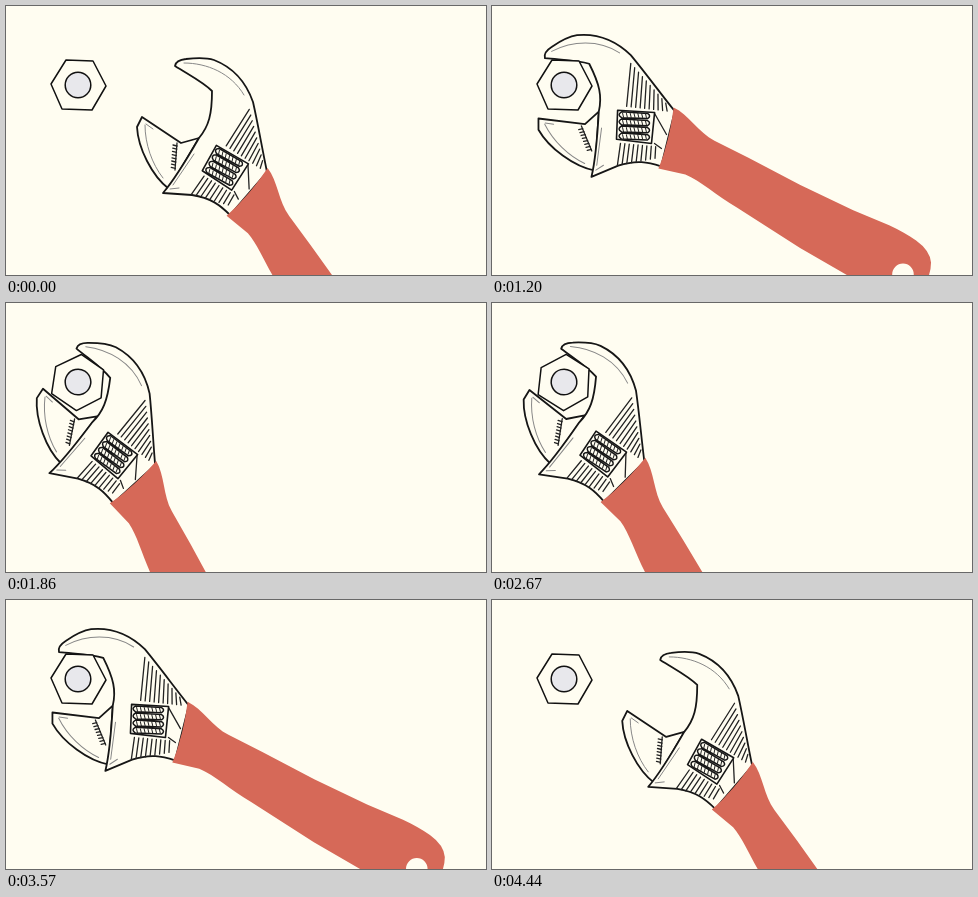
An HTML page for the animation above (4500 ms loop, 480x269 px).

```html
<!DOCTYPE html>
<html lang="en">
<head>
<meta charset="utf-8">
<title>Wrench and nut</title>
<style>
html, body { margin: 0; height: 100%; overflow: hidden; background: #fffdf1; }
svg { display: block; width: 100%; height: 100%; }
path, circle { stroke-linecap: round; stroke-linejoin: round; }
.ink { fill: #fffdf1; stroke: #161616; stroke-width: 1.8; }
.thin { fill: none; stroke: #222; stroke-width: 1.3; }
.shade { fill: none; stroke: #888; stroke-width: 1; }
.nut { fill: #fffdf1; stroke: #111; stroke-width: 1.5; }
</style>
</head>
<body>
<svg viewBox="0 0 480 269">
  <g id="wrench">
    <g id="jaw">
      <path class="ink" d="M136 111L175 137L193 132L163 183C146 170 132 142 131 121Z"/>
      <path class="shade" d="M139 119C139 138 146 158 157 172M140 118L147 123"/>
      <path class="thin" d="M171 137L169 164"/>
      <path id="teeth" class="thin"/>
    </g>
    <path class="ink" d="M169 60Q170 54 180 53C188 52 199 51 208 54C226 61 240 76 247 96C252 118 256 142 261 166L224 209C214 199 205 192 186 189L157 187C163 180 178 158 193 132C203 120 206 108 206 85C197 76 183 69 169 60Z"/>
    <path class="shade" d="M178 57C201 57 225 67 238 89M164 183L173 182M167 179L188 148"/>
    <g transform="translate(174.5 93) rotate(27) translate(-72 -79)">
      <path id="hatch" class="thin"/>
      <path class="thin" d="M162 107L174 128M162 137L169 142"/>
      <path class="ink" style="stroke-width:1.6" d="M125 104L162 106L159 137L124 133Z"/>
      <path id="worm" class="ink" style="stroke-width:1.5"/>
      <path id="ridges" class="thin" style="stroke-width:1"/>
      <path fill="#d66958" d="M181 101C196 108 206 126 222 134L256 151L308 178L361 203L397 218C408 223 416 228 424 233Q438 243 439 255Q439 270 429 281Q417 292 399 288C385 285 372 277 357 269L308 241L245 201C224 189 208 174 193 168L166 162Q171 150 173 141Q178 125 181 101Z"/>
      <circle cx="411" cy="267" r="10.8" fill="#fffdf1"/>
    </g>
  </g>
  <g id="nut">
    <path class="nut" d="M60 54L87 55L100 80L86 104L56 103L45 78Z"/>
    <circle class="nut" cx="72" cy="79" r="12.8" style="fill:#e8e8ec"/>
  </g>
</svg>
<script>
const LOOP = 4500, MIRROR = 4770;
const el = id => document.getElementById(id);
const place = (id, transform) => el(id).setAttribute('transform', transform);
const strokes = (id, count, line) =>
  el(id).setAttribute('d', Array.from({ length: count }, (_, i) => line(i)).join(''));

strokes('teeth', 8, i => `M${171 - i * .25} ${140 + i * 3.2}l-4 -1`);
strokes('hatch', 19, i => i < 10
  ? `M${138 + i * 3.9} ${57 + i * 4.4}L${134 + i * 4.5} ${100 + i * .5}`
  : `M${128 + (i - 10) * 4.4} ${137 + (i - 10) * .4}l${(i - 10) * .3 - 3} ${22 - (i - 10) * 1.3}`);
strokes('worm', 4, i =>
  `M129 ${105.5 + i * 7.1}l26 1.5q4 2.5 0 5.2l-26 -.8q-5 -3 0 -5.9z`);
strokes('ridges', 28, i =>
  `M${130 + i % 7 * 3.8} ${107 + (i / 7 | 0) * 7.1}l1 4`);

// Power ease in and out between two times.
function ease(t, from, to, power) {
  const u = Math.min(1, Math.max(0, (t - from) / (to - from)));
  const half = x => Math.pow(2 * x, power) / 2;
  return u < .5 ? half(u) : 1 - half(1 - u);
}

function draw(now) {
  const t = now % LOOP;
  const approach = Math.min(t, MIRROR - t);
  const move = ease(approach, 0, 1525, 5);
  const pull = ease(t, 1450, 2030, 5);
  const release = ease(t, 2760, 3300, 3);
  const grip = pull - release;
  const angle = -31 * ease(approach, 513, 1444, 2)
    + 39.2 * pull - 3.7 * ease(t, 2030, 2760, 2) - 35.5 * release;
  const turn = grip > 0 ? Math.max(0, angle + 25.5) : 0;
  const x = 174.5 - 102.5 * move, y = 93 - 14 * move;
  place('wrench', `translate(${x} ${y}) rotate(${angle}) translate(-174.5 -93)`);
  place('jaw', `translate(${4.7 * grip} ${-7.3 * grip})`);
  place('nut', `rotate(${turn} 72 79)`);
}

const start = performance.now();
function frame() {
  draw(performance.now() - start);
  requestAnimationFrame(frame);
}
frame();
</script>
</body>
</html>
```
